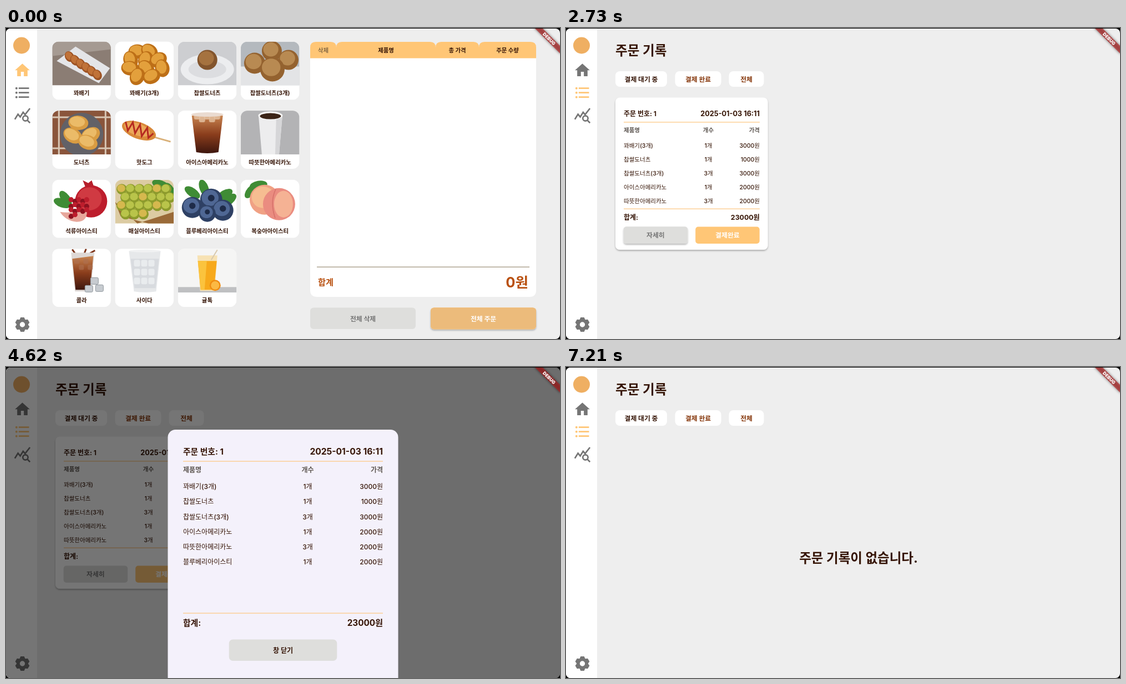
An HTML page that plays this animation: 998 px wide and 561 px high, repeating every 8 s.

```html
<!DOCTYPE html>
<html lang="ko">
<head>
<meta charset="utf-8">
<style>
html, body { margin: 0; width: 100%; height: 100%; overflow: hidden; background: #000; }
svg { display: block; font-family: Inter, "Noto Sans CJK KR", "Noto Sans CJK", sans-serif; }
</style>
</head>
<body>
<svg id="stage" width="998" height="561" viewBox="0 0 998 561"></svg>
<script>
const DARK = '#351405', RUST = '#85360a', ORANGE = '#ffc676', GREY = '#757575';

// Drawing helpers: text is placed by its vertical centre.
const text = (x, y, size, str, { anchor = 'start', weight = 700, fill = DARK } = {}) =>
  `<text x="${x}" y="${y + size * .385}" font-size="${size}" font-weight="${weight}" fill="${fill}" text-anchor="${anchor}">${str}</text>`;
const mid = { anchor: 'middle' }, end = { anchor: 'end' };
const rect = (x, y, w, h, fill, rx = 0, more = '') =>
  `<rect x="${x}" y="${y}" width="${w}" height="${h}" rx="${rx}" fill="${fill}" ${more}/>`;
const oval = (x, y, rx, ry, fill, turn = 0) =>
  `<ellipse cx="${x}" cy="${y}" rx="${rx}" ry="${ry}" fill="${fill}" transform="rotate(${turn} ${x} ${y})"/>`;
const ball = (x, y, r, fill) => oval(x, y, r, r, fill);
const blob = (x, y, rx, ry, dark, light, turn = 0) =>
  oval(x, y, rx, ry, dark, turn) + oval(x - rx * .1, y - ry * .16, rx * .76, ry * .72, light, turn);
const path = (d, fill) => `<path d="${d}" fill="${fill}"/>`;
const line = (d, color, width) =>
  `<path d="${d}" fill="none" stroke="${color}" stroke-width="${width}"/>`;
const group = (id, body, more = '') => `<g id="${id}" ${more}>${body}</g>`;
const back = fill => rect(0, 0, 106, 79, fill);
const leaf = (x, y, turn) => oval(x, y, 16, 8, '#3f8c35', turn);
const repeat = (n, f) => Array.from({ length: n }, (_, i) => f(i)).join('');

const products = [
  ['꽈배기', back('#8b7d74') + path('M0 0H106V14L0 26Z', '#a59a92') +
    path('M8 35 42 9 104 48 84 75Z', '#e4e5e8') +
    repeat(6, i => blob(31 + i * 10, 27 + i * 6.6, 10, 8, '#9d5324', '#c07238', 60))],
  ['꽈배기(3개)', back('#fff') +
    repeat(10, i => { const row = i < 2 ? 0 : i < 5 ? 1 : i < 8 ? 2 : 3;
      return blob([40, 62, 28, 55, 78, 27, 56, 85, 40, 66][i], 18 + row * 15, 16, 13, '#bd6f17', '#e3a03c', i * 37); })],
  ['찹쌀도너츠', back('#cdced1') + oval(53, 50, 48, 27, '#ecedef') + oval(53, 50, 34, 16, '#dcdde0') +
    blob(53, 33, 18, 18, '#83552d', '#a5723f')],
  ['찹쌀도너츠(3개)', back('#b4b9be') + path('M0 45H106V79H0Z', '#e3e4e6') +
    [[56, 17, 18], [25, 39, 19], [86, 33, 18], [57, 50, 22]].map(([x, y, r]) => blob(x, y, r, r, '#94622f', '#b88a52')).join('')],
  ['도너츠', back('#8a553b') + line('M0 12H106M0 68H106M12 0V79M96 0V79', '#d8c6b4', 3) + ball(53, 43, 39, '#626167') +
    [[47, 22, 5], [37, 45, 30], [69, 44, -30], [64, 57, 20]].map(([x, y, a]) => blob(x, y, 18, 13, '#d99c42', '#ebbb68', a)).join('')],
  ['핫도그', back('#fff') + line('M68 47 100 56', '#d9b079', 3) + blob(43, 36, 32, 15, '#d9893a', '#eba859', 20) +
    line('M19 20 23 36 32 21 36 41 45 25 48 46 58 31 60 49 69 41', '#b62a20', 3)],
  ['아이스아메리카노', back('#fff') + path('M25 9H81L73 75Q53 79 33 75Z', 'url(#tea)') +
    repeat(5, i => rect(29 + i * 9, 5 + i % 2 * 5, 11, 11, '#e5c4a4', 3, 'opacity=".8"')) + oval(53, 7, 29, 4, '#eadbd0')],
  ['따뜻한아메리카노', back('#b3b3b5') + path('M32 9H75L69 79H38Z', '#ededee') + path('M64 9H75L69 79H62Z', '#d6d6d8') +
    oval(53.5, 9, 22, 7.5, '#f7f7f7') + oval(53.5, 10, 19, 5.5, '#3b2417')],
  ['석류아이스티', back('#fff') + leaf(18, 42, 20) + leaf(24, 34, 55) + path('M60 14 55 1 65 6 71 1 75 12Z', '#b51f2b') +
    blob(70, 39, 29, 29, '#bd1d2c', '#d03a42') + path('M14 58Q42 62 62 50Q66 76 44 76Q24 74 14 58Z', '#e7a79b') +
    repeat(17, i => ball(34 + i % 5 * 7, 36 + (i / 5 | 0) * 9 + i % 2 * 3, 4.6, i % 2 ? '#8d1220' : '#bd1d2c'))],
  ['매실아이스티', back('#dccba2') + path('M0 40 10 66 60 79H106V58L40 79Z', '#9a6a38') + leaf(82, 9, 20) + leaf(99, 20, 60) +
    repeat(21, i => { const row = i / 6 | 0;
      return blob(12 + i % 6 * 16 + row % 2 * 7, 17 + row * 15, 9.5, 9.5, '#8d9b2c', i % 4 ? '#b9c44a' : '#d6b84e'); })],
  ['블루베리아이스티', back('#fff') + leaf(26, 23, 35) + leaf(47, 15, 70) + leaf(84, 27, -30) + leaf(92, 37, -40) +
    [[60, 36, 20], [26, 50, 19], [81, 55, 19], [53, 61, 15]].map(([x, y, r]) =>
      blob(x, y, r, r, '#2e4064', '#4f6794') + ball(x, y - 3, r * .3, '#1e2b48')).join('')],
  ['복숭아아이스티', back('#fff') + leaf(19, 20, -50) + leaf(32, 10, -10) + blob(43, 36, 27, 27, '#f0a184', '#f6bd91') +
    ball(69, 44, 29, '#ea8c80') + oval(77, 44, 17, 24, '#f5b294') + line('M63 17Q52 40 62 69', '#d57068', 1.5)],
  ['콜라', back('#fff') + line('M41 8 36 1M58 8 61 0M68 8 77 3', '#7c3218', 3) + path('M34 7H76L69 77H41Z', '#ded8d5') + path('M36 18 74 13 68 74H42Z', 'url(#tea)') +
    repeat(4, i => rect(40 + i * 8, 18 + i % 2 * 11, 9, 9, '#ad7150', 2, 'opacity=".6"')) +
    [[69, 52], [59, 66], [78, 65]].map(([x, y]) => rect(x, y, 14, 12, '#c7cbd0', 2, 'stroke="#8e959c"')).join('')],
  ['사이다', back('#fff') + path('M25 4H82L74 77Q54 80 34 77Z', '#e6e8ea') + path('M28 18H79L73 71H35Z', '#d8dbdf') +
    repeat(9, i => rect(34 + i % 3 * 13, 20 + (i / 3 | 0) * 16, 11, 12, '#e9ecee', 3)) + oval(53.5, 4, 28, 2.5, '#f0f1f2')],
  ['귤톡', back('#f5f5f4') + rect(0, 69, 106, 10, '#bfc0c2') + path('M35 12H71L66 76H40Z', '#f7e2b3') + path('M36 22H70L65 74H41Z', '#f7a91b') +
    path('M36 22H52L48 74H41Z', '#fbc33d') + line('M60 20 71 2', '#d8c9ad', 2) + ball(67, 66, 10, '#f08c12') + ball(67, 66, 7.5, '#fbb944')],
];

const card = ([name, art], i) => {
  const x = 83.3 + i % 4 * 113.2, y = 24.5 + (i / 4 | 0) * 124.6;
  return `<g transform="translate(${x} ${y})" clip-path="url(#tile)">${rect(0, 0, 106, 105, '#fff')}${
    `<g clip-path="url(#photo)">${art}</g>`}${text(52.7, 92.5, 10.4, name, mid)}</g>`;
};
const tab = (a, b, label, fill) =>
  path(`M${a} 54.5V35q0-10 10-10H${b - 10}q10 0 10 10V54.5Z`, ORANGE) + text((a + b) / 2, 39.5, 10.4, label, { ...mid, fill });

const home = products.map(card).join('') +
  path('M548 50H955V473q0 12-12 12H560q-12 0-12-12Z', '#fff') +
  tab(548, 595, '삭제', '#866a45') + tab(595, 774, '제품명') + tab(774, 852, '총 가격') + tab(852, 955, '주문 수량') +
  rect(560, 430.6, 383, 1, '#87765a') +
  text(562, 458, 15.2, '합계', { fill: '#b9500f' }) + text(941, 458, 25.5, '0원', { ...end, fill: '#b9500f' }) +
  rect(548, 504.5, 190, 38.5, '#dededc', 6) + text(643, 524, 11.8, '전체 삭제', { ...mid, fill: GREY }) +
  rect(765, 504.5, 190, 39, ORANGE, 6, 'id="orderShadow" filter="url(#lift)"') +
  rect(765, 504.5, 190, 38.5, ORANGE, 6) + rect(765, 504.5, 190, 38.5, '#dfb47f', 6, 'id="orderTint"') +
  text(860, 524, 11.8, '전체 주문', { ...mid, fill: '#fff' });

const chip = (x, w, label, fill) => rect(x, 78, w, 28, '#fff', 8) + text(x + w / 2, 92, 11.8, label, { ...mid, fill });
const items = [['꽈배기(3개)', 1, 3000], ['찹쌀도너츠', 1, 1000], ['찹쌀도너츠(3개)', 3, 3000],
  ['아이스아메리카노', 1, 2000], ['따뜻한아메리카노', 3, 2000], ['블루베리아이스티', 1, 2000]];

// One receipt layout, used by the card and the sheet.
const receipt = (o) => {
  const { left, right, centre, big, small, top, head, first, step, count, rule1, rule2, total } = o;
  const soft = { fill: '#5e5752', weight: 600 }, plain = { weight: 500 };
  return text(left, top, big, '주문 번호: 1') + text(right, top, big * 1.055, '2025-01-03 16:11', end) +
    rect(left, rule1, right - left, 1.4, '#fdce91') + rect(left, rule2, right - left, 1.4, '#fdce91') +
    text(left, head, small, '제품명', soft) + text(centre, head, small, '개수', { ...mid, ...soft }) + text(right, head, small, '가격', { ...end, ...soft }) +
    items.slice(0, count).map(([name, n, won], i) => {
      const y = first + i * step;
      return text(left, y, small, name, plain) + text(centre, y, small, n + '개', { ...mid, ...plain }) + text(right, y, small, won + '원', { ...end, ...plain });
    }).join('') +
    text(left, total, big, '합계:') + text(right, total, big * 1.03, '23000원', end);
};
const button = (id, x, label, fill, ink) =>
  rect(x, 358.5, 115.5, 30.5, fill, 5, `id="${id}Shadow" filter="url(#lift)"`) + rect(x, 358.5, 115.5, 30.5, fill, 5) +
  `<clipPath id="${id}Clip">${rect(x, 358.5, 115.5, 30.5, '#000', 5)}</clipPath>` +
  `<circle id="${id}Splash" cy="373" clip-path="url(#${id}Clip)"/>` + text(x + 57.7, 373.5, 11.9, label, { ...mid, fill: ink });

const orders = text(89, 40, 23.6, '주문 기록') + chip(89, 93, '결제 대기 중') + chip(196.5, 83, '결제 완료', RUST) + chip(293.5, 63, '전체', RUST) +
  `<path id="spinner" fill="none" stroke="#535f80" stroke-width="3"/>` +
  group('ticket', rect(89, 125.5, 274.5, 274.5, '#fff', 8, 'filter="url(#lift)"') +
    receipt({ left: 104, right: 349, centre: 256.5, big: 12, small: 10.5, top: 154.5, head: 184, first: 212, step: 24.9, count: 5, rule1: 169.2, rule2: 325.6, total: 341.5 }) +
    button('detail', 103.7, '자세히', '#dededc', GREY) + button('paid', 233.2, '결제완료', ORANGE, '#fff')) +
  group('empty', text(527, 343.5, 23.5, '주문 기록이 없습니다.', mid));

const sheet = rect(291.5, 113, 415, 480, '#f4f1fb', 14) +
  receipt({ left: 319, right: 679, centre: 543.5, big: 14.8, small: 12, top: 152, head: 185, first: 215.5, step: 27.2, count: 6, rule1: 169.4, rule2: 443.4, total: 461.5 }) +
  rect(401.7, 491.5, 194.6, 38.5, '#dededc', 7, 'id="closeShadow" filter="url(#lift)"') +
  rect(401.7, 491.5, 194.6, 38.5, '#dededc', 7) + rect(401.7, 491.5, 194.6, 38.5, '#535f80', 7, 'id="closeTint"') +
  text(499, 511, 12, '창 닫기', mid);

const icon = (id, y, body) => group(id, body, `transform="translate(13.5 ${y}) scale(1.333)" fill="${GREY}" stroke="none"`);
const sidebar = rect(0, 1, 56, 560, '#fff') + ball(28, 31.5, 15, '#efaf62') +
  rect(8, 95, 40, 40.5, '#dcdcdc', 0, 'id="pressed"') +
  icon('homeIcon', 60.3, '<path d="M10 20v-6h4v6h5v-8h3L12 3 2 12h3v8z"/>') +
  icon('listIcon', 100.7, repeat(3, i => `<circle cx="4" cy="${6 + i * 6}" r="1.5"/><path d="M7 ${5 + i * 6}H21v2H7z"/>`)) +
  icon('statsIcon', 141.5, line('M1.8 17.5 6.1 10.6 9.1 14.2 13 7.9 15.7 11 22.2 2.6M18.6 18.6 22.3 22.3', GREY, 2) +
    `<circle cx="16.1" cy="16.1" r="3.5" fill="#fff" stroke="${GREY}" stroke-width="2"/>`) +
  `<g transform="translate(29.5 535)">${repeat(6, i => `<path d="M-5.4-8 -3.2-13H3.2L5.4-8Z" fill="${GREY}" transform="rotate(${i * 60})"/>`)}` +
  `<circle r="7.2" fill="none" stroke="${GREY}" stroke-width="5"/></g>`;

// Corner ribbon: a soft shadow under a translucent red band.
const banner = `<g transform="translate(978.5 19.5) rotate(45)">${
  rect(-33, -4.9, 66, 9.8, '#000', 0, 'opacity=".5" filter="url(#soft)"')}${
  rect(-33, -4.9, 66, 9.8, '#b71c1c', 0, 'opacity=".63"')}` +
  text(0, -.2, 8.2, 'DEBUG', { ...mid, weight: 900, fill: '#fff' }) + '</g>';

const stage = document.getElementById('stage');
stage.innerHTML = `<defs>
  <clipPath id="window">${rect(0, 1, 998, 560, '#000', 8)}</clipPath>
  <clipPath id="tile">${rect(0, 0, 105.5, 105, '#000', 12)}</clipPath>
  <clipPath id="photo">${rect(0, 0, 106, 79, '#000')}</clipPath>
  <linearGradient id="tea" x2="0" y2="1"><stop stop-color="#c88450"/><stop offset=".5" stop-color="#8a3d1c"/><stop offset="1" stop-color="#3d160e"/></linearGradient>
  <filter id="lift" x="-20%" y="-30%" width="140%" height="180%"><feDropShadow dx="0" dy="2" stdDeviation="1.6" flood-opacity=".28"/></filter>
  <filter id="soft" x="-20%" y="-120%" width="140%" height="340%"><feGaussianBlur stdDeviation="2.6"/></filter>
</defs><g clip-path="url(#window)">${rect(0, 0, 998, 561, '#eee')}${sidebar}${group('home', home)}${group('orders', orders)}${
  rect(0, 0, 998, 561, '#000', 0, 'id="barrier"')}${group('sheet', sheet)}${banner}</g>`;

const $ = id => document.getElementById(id);
const set = (id, values) => { for (const k in values) $(id).setAttribute(k, values[k]); };
const show = (id, on) => set(id, { opacity: +on });
const ramp = (t, a, b) => Math.min(1, Math.max(0, (t - a) / (b - a)));
const bezier = (x1, y1, x2, y2) => x => {
  const at = (s, a, b) => 3 * s * (1 - s) ** 2 * a + 3 * s * s * (1 - s) * b + s ** 3;
  let lo = 0, hi = 1;
  for (let i = 0; i < 24; i++) { const m = (lo + hi) / 2; at(m, x1, x2) < x ? lo = m : hi = m; }
  return at(lo, y1, y2);
};
const ease = bezier(.25, .1, .25, 1), slide = bezier(0, 0, .2, 1), sweepEase = bezier(.4, 0, .2, 1);

function spin(s) {
  const start = (-90 + s * 360 / 2222 + s * 90 / 1333) * Math.PI / 180;
  const sweep = 1.5 * Math.PI * sweepEase(ramp(s, 0, 667));
  const at = a => `${527.5 + 14 * Math.cos(a)} ${344 + 14 * Math.sin(a)}`;
  set('spinner', { d: `M${at(start)}A14 14 0 ${+(sweep > Math.PI)} 1 ${at(start + sweep)}` });
}

function splash(id, cx, t, start, fill, strength) {
  const fade = ramp(t, start, start + 60) * (1 - ramp(t, start + 130, start + 400));
  set(id + 'Splash', { cx, r: 10 + ramp(t, start, start + 300) * 102, fill, opacity: strength * fade });
}

function draw(t) {
  const onOrders = t >= 1150, loaded = t >= 1820, cleared = t >= 7000;
  show('home', !onOrders);
  show('orders', onOrders);
  set('homeIcon', { fill: onOrders ? GREY : ORANGE });
  set('listIcon', { fill: onOrders ? ORANGE : GREY });
  show('pressed', ramp(t, 980, 1190) * (1 - ramp(t, 1750, 1890)));
  show('orderTint', .6 * (1 - ramp(t, 70, 490)));
  show('orderShadow', 1 - ramp(t, 70, 490));

  show('spinner', !loaded);
  spin(Math.max(0, Math.min(t, 1400) - 1150));
  show('ticket', loaded && !cleared);
  show('empty', cleared);
  show('detailShadow', ramp(t, 2380, 2730) * (1 - ramp(t, 3400, 3710)));
  splash('detail', 156.5, t, 3260, '#7085c8', .3);
  show('paidShadow', ramp(t, 5950, 6440));
  splash('paid', 291, t, 6750, '#fff', .3);

  const open = t < 5000 ? ramp(t, 3310, 3560) : 1 - ramp(t, 5273, 5473);
  show('barrier', .54 * ease(open));
  set('sheet', { transform: `translate(0 ${(1 - slide(open)) * 448})`, visibility: open ? 'visible' : 'hidden' });
  show('closeTint', .07 * ramp(t, 4620, 4690));
  show('closeShadow', ramp(t, 4620, 4830));
}

// The screen refreshes every 70 ms.
(function tick() {
  const t = performance.now() % 8000;
  draw(t - t % 70);
  requestAnimationFrame(tick);
})();
</script>
</body>
</html>
```
